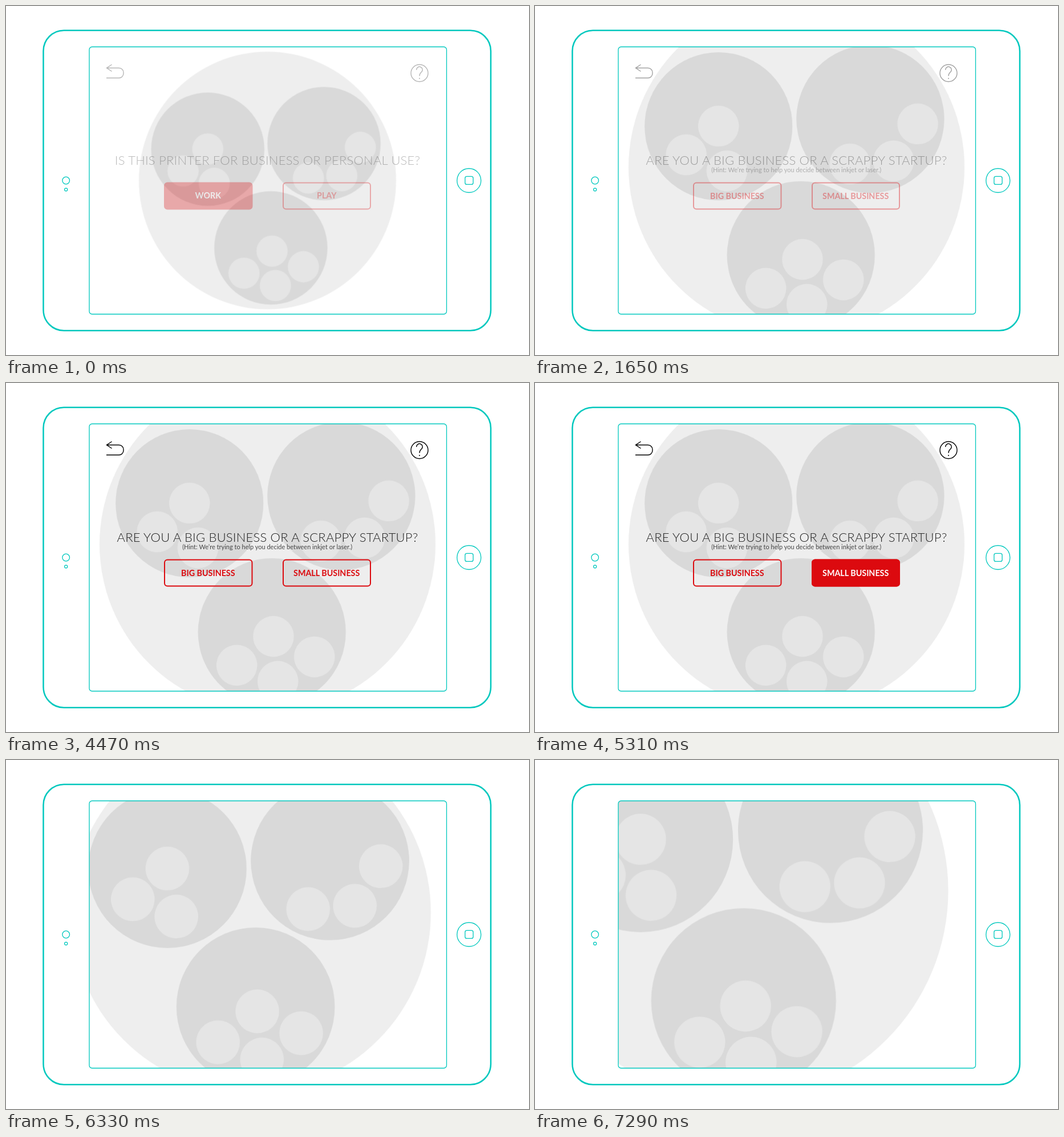
Recreate the animation shown at these times as an HTML page. Size 917 by 611 pixels, loop 7.35 s.

```html
<!DOCTYPE html>
<html lang="en">
<head>
<meta charset="utf-8">
<title>Tablet questionnaire</title>
<style>
  html, body { margin: 0; width: 100%; height: 100%; overflow: hidden; background: #fff; }
  svg { display: block; width: 917px; height: 611px; }
  text { font-family: Lato, "Open Sans", sans-serif; text-anchor: middle; }

  .device { fill: none; stroke: #00c8be; stroke-width: 1.3; }
  .ask { font-size: 22px; font-weight: 300; letter-spacing: .2px; fill: #222; }
  .hint { font-size: 11px; fill: #444; }
  .label { font-size: 14.3px; font-weight: 700; fill: #dc0a0f; }
  .button { fill: none; stroke: #dc0a0f; stroke-width: 2; }
  .on .button { fill: #dc0a0f; }
  .on .label { fill: #fff; }
  .icon { fill: none; stroke: #000; stroke-width: 1.4; }

  .world, .first, .second, .icons, .picked { animation: 7350ms linear infinite; }
  .world { animation-name: zoom; }
  .first { animation-name: leave; }
  .second { animation-name: visit; }
  .icons { animation-name: leave-visit; }
  .picked { animation-name: pick; }

  @keyframes zoom {
    0%, .27% { transform: translate(458.5px, 305.5px) scale(1); animation-timing-function: cubic-bezier(.48, 0, .52, 1); }
    21.22% { transform: translate(458.5px, 282.2px) scale(1.306); }
    77.01% { transform: translate(458.5px, 282.2px) scale(1.306); animation-timing-function: cubic-bezier(.426, 0, .607, .881); }
    100% { transform: translate(354.8px, 228.1px) scale(1.638); }
  }
  @keyframes leave {
    0% { opacity: .31; }
    1.36%, 100% { opacity: 0; }
  }
  @keyframes visit {
    0%, 20.95% { opacity: 0; }
    25.03%, 74.01% { opacity: 1; }
    78.1%, 100% { opacity: 0; }
  }
  @keyframes leave-visit {
    0% { opacity: .29; }
    1.36%, 20.95% { opacity: 0; }
    25.03%, 74.01% { opacity: 1; }
    78.1%, 100% { opacity: 0; }
  }
  @keyframes pick {
    0%, 68% { opacity: 0; }
    70%, 100% { opacity: 1; }
  }
</style>
</head>
<body>
<svg viewBox="0 0 917 611">
  <defs>
    <clipPath id="screen"><rect x="146" y="71.5" width="626.5" height="468" rx="5"/></clipPath>
    <rect id="left" x="278" y="309.5" width="153.5" height="46" rx="5"/>
    <rect id="right" x="486" y="309.5" width="153" height="46" rx="5"/>
  </defs>

  <g clip-path="url(#screen)">
    <g class="world">
      <circle r="225.5" fill="#eee"/>
      <g fill="#d9d9d9">
        <circle cx="-104.7" cy="-54.8" r="99.2"/>
        <circle cx="99.1" cy="-64.6" r="99.2"/>
        <circle cx="5.9" cy="118" r="99.2"/>
      </g>
      <g id="dots" fill="#e5e5e5"></g>
    </g>
  </g>

  <g class="first">
    <text class="ask" x="458.5" y="278">IS THIS PRINTER FOR BUSINESS OR PERSONAL USE?</text>
    <g class="on">
      <use href="#left" class="button" fill="#dc0a0f"/>
      <text class="label" x="354.3" y="336.5">WORK</text>
    </g>
    <use href="#right" class="button"/>
    <text class="label" x="562.3" y="336.5">PLAY</text>
  </g>

  <g class="second">
    <text class="ask" x="458.5" y="278">ARE YOU A BIG BUSINESS OR A SCRAPPY STARTUP?</text>
    <text class="hint" x="458.2" y="291">(Hint: We’re trying to help you decide between inkjet or laser.)</text>
    <use href="#left" class="button"/>
    <text class="label" x="354.3" y="338">BIG BUSINESS</text>
    <use href="#right" class="button"/>
    <text class="label" x="562.2" y="338">SMALL BUSINESS</text>
    <g class="on picked">
      <use href="#right" class="button"/>
      <text class="label" x="562.2" y="338">SMALL BUSINESS</text>
    </g>
  </g>

  <g class="icons">
    <path class="icon" d="M185.5 102.5L176.5 108.5L185.5 114.5M176.5 108.5H198a8 8 0 0 1 8 8v1.5a8 8 0 0 1-8 8H176"/>
    <circle class="icon" cx="725" cy="117.5" r="15"/>
    <path class="icon" d="M719.7 112a5.3 5.3 0 1 1 8.6 3.8C726 117.7 725 119 725 122.5"/>
    <circle cx="725" cy="126.7" r="1"/>
  </g>

  <g class="device">
    <rect x="65.5" y="42.7" width="784.5" height="525.6" rx="36" stroke-width="2.5"/>
    <rect x="146" y="71.5" width="626.5" height="468" rx="5"/>
    <circle cx="105.2" cy="305.5" r="6.3"/>
    <circle cx="105.2" cy="321.4" r="2.5"/>
    <circle cx="811.8" cy="305.5" r="21"/>
    <rect x="804.9" y="298.4" width="14.2" height="14" rx="3"/>
  </g>
</svg>
<script>
  const spots = [
    [-104.7, -55.1], [-148, -16.6], [-93.4, 5],
    [162.8, -58], [71.7, -4.3], [130.3, -8.4],
    [8, 123.6], [-41.2, 162.3], [63, 151], [13.9, 183.9]
  ];
  document.getElementById("dots").innerHTML =
    spots.map(([x, y]) => `<circle cx="${x}" cy="${y}" r="27.4"/>`).join("");
</script>
</body>
</html>
```
